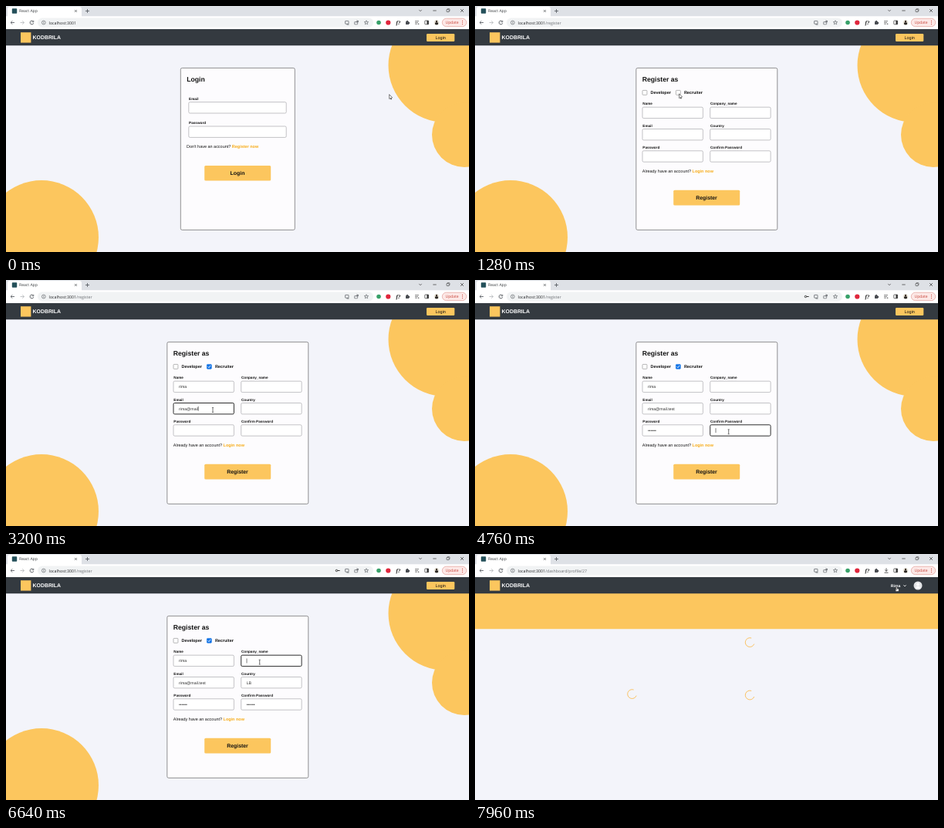
These frames come from a looping animation (600 by 319 pixels, 8000 ms). An HTML page with a canvas:

```html
<!DOCTYPE html>
<html lang="en">
<head>
<meta charset="utf-8">
<title>Register demo</title>
<style>
html, body { margin: 0; width: 100%; height: 100%; overflow: hidden; background: #f3f4fa; }
canvas { display: block; width: 600px; height: 319px; }
</style>
</head>
<body>
<canvas id="stage"></canvas>
<script>
const W = 600, H = 319, LOOP = 8000;
const canvas = document.getElementById('stage');
const g = canvas.getContext('2d');
const dpr = window.devicePixelRatio || 1;
canvas.width = Math.round(W * dpr);
canvas.height = Math.round(H * dpr);

const PAGE_FONT = '"Liberation Sans", Arial, sans-serif';
const UI_FONT = '"Open Sans", "Noto Sans", sans-serif';
const YELLOW = '#fcc65e', INK = '#111', LINK = '#f7ab16', ICON = '#50545a', ALERT = '#c9453b';
const { PI } = Math, TAU = PI * 2;

const AT = { register: 1060, check: 1370, submit: 7320, load: 7590, dash: 7870 };
const KEY_GAP = 50, AT_SIGN_PAUSE = 240, BLINK = 200;

// In the order they are filled in; focus and type are moments
const FIELDS = [
  { label: 'Name', col: 0, row: 0, value: 'rima', focus: 1550, type: 1780 },
  { label: 'Email', col: 0, row: 1, value: 'rima@mail.test', focus: 2350, type: 2550 },
  { label: 'Password', col: 0, row: 2, value: '••••••', focus: 3830, type: 4070 },
  { label: 'Confirm Password', col: 1, row: 2, value: '••••••', focus: 4710, type: 4900 },
  { label: 'Country', col: 1, row: 1, value: 'LB', focus: 5550, type: 6350 },
  { label: 'Conpany_name', col: 1, row: 0, value: 'hhhh', focus: 6600, type: 6750 }
];
FIELDS.forEach((f, i) => {
  f.x = 217 + f.col * 87.7;
  f.y = 131.2 + f.row * 28.3;
  f.blur = i + 1 < FIELDS.length ? FIELDS[i + 1].focus : AT.submit;
});
const KEY_ICON = FIELDS[2].type;

// Places the pointer has reached by the given moment
const stop = (t, x, y, travel = 200) => ({ t, x, y, travel });
const STOPS = [
  stop(0, 496.7, 114.7), stop(960, 311, 181), stop(1270, 264.6, 113.8),
  ...FIELDS.map(f => stop(f.focus + 30, f.x + (f.col ? 24 : 51), f.y + 9, 110)),
  stop(7300, 301, 248), stop(7790, 469, 221), stop(7950, 546, 42)
];

function pointer(t) {
  let p = STOPS[0];
  for (const s of STOPS.slice(1)) {
    const from = Math.max(p.t, s.t - s.travel);
    if (t < from) return p;
    if (t < s.t) {
      const u = (t - from) / (s.t - from), e = u * u * (3 - 2 * u);
      return { x: p.x + (s.x - p.x) * e, y: p.y + (s.y - p.y) * e };
    }
    p = s;
  }
  return p;
}

function text(s, x, y, size, o = {}) {
  g.font = `${o.weight || 400} ${size}px ${o.font || PAGE_FONT}`;
  g.textAlign = o.align || 'left';
  g.fillStyle = o.color || INK;
  g.fillText(s, x, y);
  return g.measureText(s).width;
}

const bold = (s, x, y, size, o) => text(s, x, y, size, { weight: 700, ...o });

function paint(fill, stroke, lw) {
  if (fill) { g.fillStyle = fill; g.fill(); }
  if (stroke) { g.strokeStyle = stroke; g.lineWidth = lw; g.stroke(); }
}

function box(x, y, w, h, r, fill, stroke, lw = 0.6) {
  g.beginPath();
  g.roundRect(x, y, w, h, r);
  paint(fill, stroke, lw);
}

function disc(x, y, r, fill, stroke, lw = 0.7) {
  arc(x, y, r, 0, TAU, stroke, lw, fill);
}

function arc(x, y, r, from, to, stroke, lw, fill) {
  g.beginPath();
  g.arc(x, y, r, from, to);
  paint(fill, stroke, lw);
}

function dash(x, y, len, angle = 0, color = ICON, lw = 0.8) {
  const dx = Math.cos(angle) * len / 2, dy = Math.sin(angle) * len / 2;
  g.beginPath();
  g.moveTo(x - dx, y - dy);
  g.lineTo(x + dx, y + dy);
  paint(null, color, lw);
}

function cross(x, y, len, turn, color, lw) {
  dash(x, y, len, turn, color, lw);
  dash(x, y, len, turn + PI / 2, color, lw);
}

// A V with its tip at (x, y), pointing along angle
function chevron(x, y, r, angle, color = ICON, lw = 0.8) {
  g.beginPath();
  for (const a of [-0.75, 0, 0.75]) {
    const d = a ? r * 1.41 : 0;
    g.lineTo(x - Math.cos(angle + a) * d, y - Math.sin(angle + a) * d);
  }
  paint(null, color, lw);
}

function arrow(x, y, len, angle, color) {
  dash(x, y, len, angle, color);
  chevron(x + Math.cos(angle) * len / 2, y + Math.sin(angle) * len / 2, len * 0.45, angle, color);
}

function star(x, y) {
  g.beginPath();
  for (let i = 0; i < 10; i++) {
    const a = i * PI / 5 - PI / 2, r = i % 2 ? 1.2 : 2.8;
    g.lineTo(x + Math.cos(a) * r, y + Math.sin(a) * r);
  }
  g.closePath();
  paint(null, ICON, 0.6);
}

function tabStrip(loading) {
  box(0, 0, W, 14, 0, '#dee1e6');
  box(2, 1, 96, 16, 3, '#fff');
  if (loading) disc(11, 6.5, 2.5, '#5f6368');
  else box(7.8, 3.2, 6.4, 6.6, 0.8, '#24505a');
  text('React App', 17, 8.4, 5.1, { font: UI_FONT, color: '#3c4043' });
  cross(90.5, 6.5, 4, PI / 4, '#3c4043', 0.7);
  cross(105.5, 6.5, 5, 0);
  chevron(537, 6.8, 1.8, PI / 2, '#444', 0.7);
  dash(555.5, 6, 4.4, 0, '#333', 0.7);
  box(571.8, 3.6, 3.2, 3.2, 0.6, null, '#333', 0.5);
  box(571, 4.4, 3.2, 3.2, 0.6, '#dee1e6', '#333', 0.6);
  cross(591, 6, 5.4, PI / 4, '#333', 0.7);
}

function addressBar(t, loading, done) {
  const y = 21.5;
  arrow(8.5, y, 5, PI);
  arrow(21, y, 5, 0, '#b5b8bc');
  if (loading) {
    cross(33.5, y, 5.6, PI / 4);
  } else {
    arc(33.5, y, 2.4, 0.3, 5.4, ICON, 0.9);
    chevron(35.8, 20.8, 1.4, PI / 4);
  }
  box(41, 15.6, 435, 11.8, 5.9, '#f1f3f4');
  disc(48.8, y, 2.4, null, ICON, 0.6);
  dash(48.8, y, 2.6, PI / 2, ICON, 0.6);

  const w = text('localhost:3001', 55.6, 23.5, 5.25, { font: UI_FONT, color: '#202124' });
  const path = done ? '/dashboard/profile/27' : loading ? '/dashboard/profile/25'
    : t >= AT.register ? '/register' : '';
  text(path, 55.6 + w, 23.5, 5.25, { font: UI_FONT, color: '#686c71' });

  if (t >= KEY_ICON && !done) {
    disc(428.4, y, 1.2, null, '#333', 0.9);
    dash(431, y, 3.2, 0, '#333', 1);
  }
  box(439.6, 19.4, 4.4, 3.8, 0.5, null, ICON, 0.7);
  dash(443, 24, 3, 0);
  box(451.6, 20.6, 4, 3.2, 0.4, null, ICON, 0.6);
  arrow(455, 20.3, 3.4, -0.5);
  star(467, y);
}

function extensions(done) {
  const y = 21.5;
  disc(483, y, 2.8, '#38a169');
  disc(495.3, y, 3.1, '#e0263c');
  text('f?', 505.4, 23.8, 7, { weight: 'italic 700', font: '"Liberation Serif", serif' });
  box(518, 20, 4.2, 4, 0.5, '#4a4d52');
  disc(520, 19.8, 1, '#4a4d52');
  disc(522.3, 22, 1, '#4a4d52');
  if (done) {
    arrow(533, 20.4, 4, PI / 2, '#333');
    dash(533, 24.2, 5, 0, '#333');
  } else {
    for (let i = 0; i < 3; i++) dash(532.5 - i * 0.5, 19.6 + i * 1.8, 5 - i, 0, '#555', 0.7);
    disc(534.6, 23.2, 0.8, '#555');
  }
  box(542.8, 19, 4.8, 4.8, 0.6, null, '#333', 0.7);
  box(545.4, 19, 2.2, 4.8, 0, '#333');
  disc(558, y, 3.3, '#e9e4d8');
  disc(558, 20, 1.2, '#3d3129');
  box(556, 21.3, 4, 3, 1.2, '#2b2724');
  box(565.3, 16.2, 31.4, 10.4, 5.2, '#fce8e6', '#dd8e86');
  text('Update', 569.5, 23.4, 5, { font: UI_FONT, color: ALERT });
  for (let i = -1; i < 2; i++) disc(591.5, y + i * 2.1, 0.55, ALERT);
}

function header(done) {
  box(0, 30, W, 21.3, 0, '#343a40');
  box(19, 34.2, 13.4, 13.4, 0, YELLOW);
  bold('KODBRILA', 34.6, 43.4, 6.9, { color: '#fff' });
  if (!done) {
    box(545, 36, 36.3, 9.9, 1.2, YELLOW);
    text('Login', 563.2, 42.9, 5.5, { align: 'center' });
    return;
  }
  bold('Rima', 538.8, 42.8, 5.1, { color: '#fff' });
  chevron(557, 42, 1.7, PI / 2, '#fff');
  disc(574, 41, 5.5, '#e4e5e7');
  disc(574, 39.4, 1.9, '#fff');
  arc(574, 44.6, 2.8, PI, TAU, null, 0, '#fff');
}

function backdrop() {
  disc(569.5, 77, 74, YELLOW);
  disc(594, 167, 42, YELLOW);
  disc(46, 300, 74, YELLOW);
}

function card(w, title, button, by) {
  const x = 300 - w / 2 + 0.3;
  box(x, 80.4, w, 210, 2, '#fdfcfe', '#666', 0.7);
  bold(title, x + 8, 97.6, 8.65);
  box(257.2, by, 86, 19.6, 1.5, YELLOW);
  bold(button, 300, by + 12.2, 6.9, { align: 'center' });
}

function prompt(x, y, question, link) {
  const w = text(question + ' ', x, y, 5.47);
  bold(link, x + w, y, 5.47, { color: LINK });
}

function input(label, x, y, w, active) {
  bold(label, x + 0.3, y - 2.8, 4.65);
  box(x, y, w, 14.4, 1.6, '#fff', active ? '#222' : '#9a9aa0', active ? 0.95 : 0.6);
}

function loginPage() {
  card(148, 'Login', 'Login', 207);
  input('Email', 236.8, 124.6, 126.4);
  input('Password', 236.8, 156, 126.4);
  prompt(234, 184, "Don't have an account?", 'Register now');
}

function checkbox(x, label, on) {
  const y = 109.4;
  box(x, y, 5.9, 5.9, 0.8, on ? '#1273e6' : '#fff', on ? '#1273e6' : '#888');
  if (on) {
    dash(x + 1.9, y + 3.6, 2, PI / 4, '#fff', 0.9);
    dash(x + 3.6, y + 2.9, 3.6, -0.9, '#fff', 0.9);
  }
  bold(label, x + 10.5, 114.3, 5.45);
}

function keyTime(f, i) {
  const sign = f.value.indexOf('@');
  return f.type + i * KEY_GAP + (sign > 0 && i >= sign ? AT_SIGN_PAUSE : 0);
}

function field(f, t) {
  const active = t >= f.focus && t < f.blur;
  input(f.label, f.x, f.y, 78.4, active);
  let typed = 0, last = f.focus;
  while (typed < f.value.length && t >= keyTime(f, typed)) last = keyTime(f, typed++);
  const w = text(f.value.slice(0, typed), f.x + 7, f.y + 9.1, 5.2, { color: '#2c2c2c' });
  if (active && Math.floor((t - last) / BLINK) % 2 === 0) {
    dash(f.x + 7.3 + w, f.y + 7.3, 6, PI / 2, '#222', 0.6);
  }
}

function registerPage(t) {
  card(183, 'Register as', 'Register', 238.8);
  checkbox(217, 'Developer', false);
  checkbox(260.4, 'Recruiter', t >= AT.check);
  for (const f of FIELDS) field(f, t);
  prompt(216.8, 215.7, 'Already have an account?', 'Login now');
}

function dashboard(t) {
  box(0, 51, W, 46.2, 0, YELLOW);
  const a = 0.35 + (t - 7960) / 1400 * TAU;
  const spinner = (x, y) => arc(x, y, 5.9, a, a + 4.7, '#fbc364', 1);
  spinner(356.2, 114.6);
  spinner(203.6, 181.6);
  spinner(356.2, 183);
}

function drawPointer(t) {
  const { x, y } = pointer(t);
  const over = (from, to) => t > from && t < to;
  if (over(1480, 7150)) {
    dash(x, y, 6, PI / 2, '#333', 0.7);
    for (const d of [-3, 3]) dash(x, y + d, 2.2, 0, '#333', 0.6);
  } else if (over(930, 1100) || over(7220, 7620) || t > 7930) {
    box(x - 1, y + 2.8, 4.2, 3.8, 1.2, '#fff', '#222');
    box(x - 0.4, y, 1.3, 4.6, 0.6, '#fff', '#222', 0.5);
  } else {
    dash(x + 2, y + 4.9, 3.4, 1.15, '#222', 1.1);
    g.beginPath();
    g.moveTo(x, y);
    g.lineTo(x, y + 5.7);
    g.lineTo(x + 3.9, y + 4.1);
    g.closePath();
    paint('#fff', '#222', 0.6);
  }
}

function render(t) {
  g.setTransform(dpr, 0, 0, dpr, 0, 0);
  g.textRendering = 'geometricPrecision';
  const done = t >= AT.dash, loading = t >= AT.load && !done;
  box(0, 0, W, H, 0, '#f3f4fa');
  if (done) {
    dashboard(t);
  } else {
    backdrop();
    if (t < AT.register) loginPage();
    else registerPage(t);
  }
  header(done);
  tabStrip(loading);
  box(0, 13.2, W, 16.8, 0, '#fff');
  addressBar(t, loading, done);
  extensions(done);
  drawPointer(t);
}

const start = performance.now();
function frame() {
  render((performance.now() - start) % LOOP);
  requestAnimationFrame(frame);
}
frame();
</script>
</body>
</html>
```
